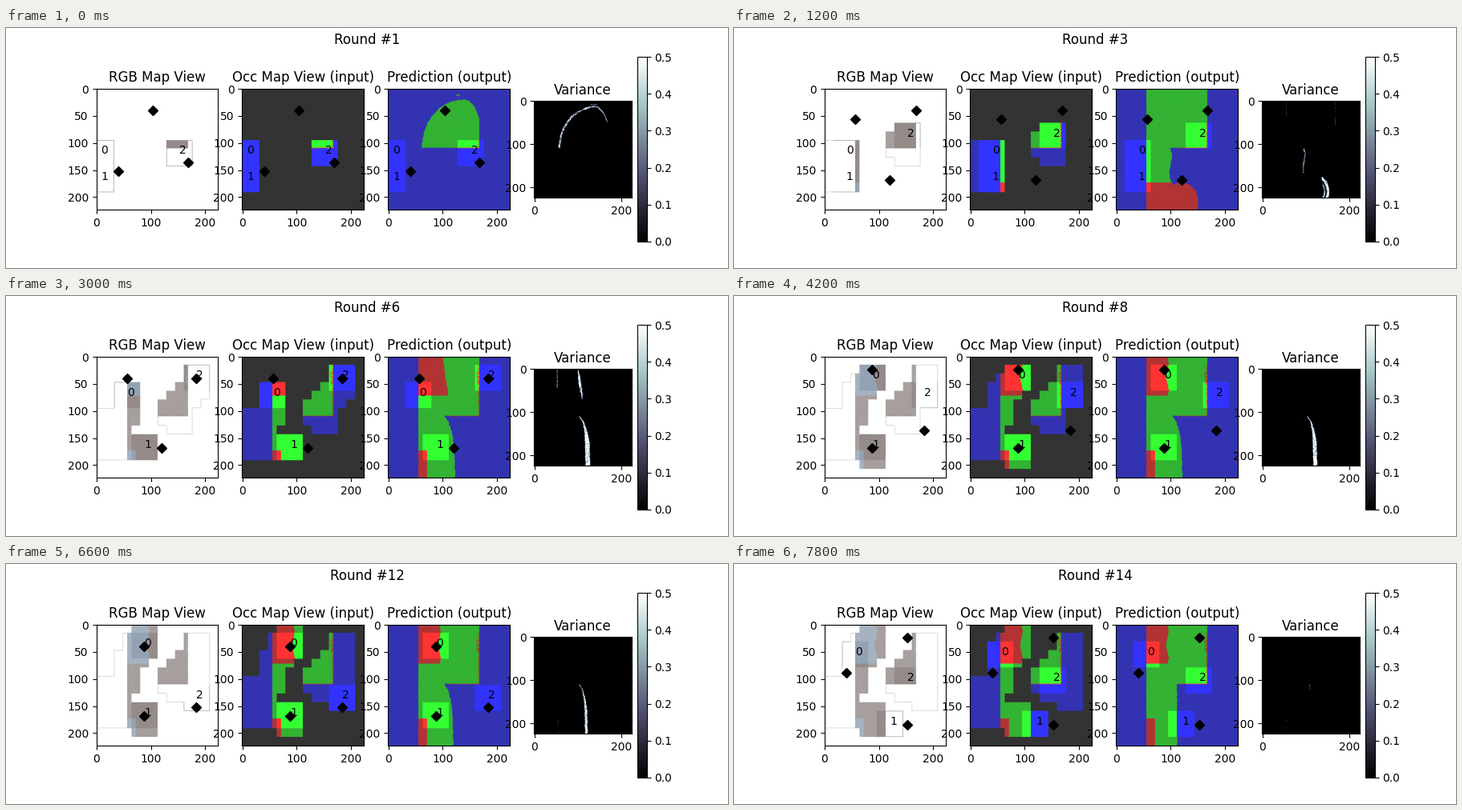
A matplotlib script for the animation above (8000 ms loop, 900 by 300 pixels).

```python
import numpy as np
import matplotlib.pyplot as plt
from matplotlib.animation import FuncAnimation

N, CELL, ROUNDS = 224, 16, 14
RED, GREEN, BLUE = 0, 1, 2
Y, X = np.mgrid[:N, :N]
WALL_L, WALL_R, TURN_X, TURN_Y = 56, 168, 112, 110
rng = np.random.default_rng(4)

# Waypoints in grid cells; a repeated one means waiting a round
WAYPOINTS = [
    [(0, 7), (2, 7), (3, 4), (5, 1), (4, 2), (5, 2), (5, 2), (3, 3)],
    [(0, 10), (5, 10), (5, 11)] + [(5, 10)] * 5 + [(7, 11)],
    [(9, 7), (8, 6), (10, 4), (11, 2), (11, 8), (9, 6)],
]
# Goals, keyed by the round in which they are chosen
GOALS = {
    1: [(6, 2), (2, 9), (10, 8)],
    2: [(3, 3), (7, 10), (10, 2)],
    4: [(3, 2), (7, 10), (11, 2)],
    7: [(5, 1), (5, 10), (11, 8)],
    9: [(4, 2), (5, 10), (11, 9)],
    11: [(5, 2), (5, 10), (11, 9)],
    13: [(2, 5), (9, 11), (9, 1)],
}


def walk(stops):
    """Move one cell per round, diagonals allowed, from stop to stop."""
    path = [np.array(stops[0])]
    for stop in stops[1:]:
        path.append(path[-1] + np.sign(stop - path[-1]))
        while (path[-1] != stop).any():
            path.append(path[-1] + np.sign(stop - path[-1]))
    return path


PATHS = [walk(stops) for stops in WAYPOINTS]


def centre(cell):
    return cell[0] * CELL + CELL // 2, cell[1] * CELL + CELL // 2


def goals_at(rnd):
    return GOALS[max(k for k in GOALS if k <= rnd)]


def wobble(size):
    """Smooth random offset for each row."""
    steps = rng.normal(0, size, N + 4)
    return np.convolve(steps, np.ones(5) / 3, "valid")[:, None]


def view(rnd):
    mask = np.zeros((N, N), bool)
    for path in PATHS:
        x, y = centre(path[rnd - 1])
        mask |= (abs(X + 0.5 - x) < 24) & (abs(Y + 0.5 - y) < 24)
    return mask


def ellipse(cx, cy, rx, ry):
    return np.hypot((X - cx) / rx, (Y - cy) / ry)


LOWER_WOBBLE = wobble(0.5)
RED_EDGE = 94 + 2 * np.sin(Y / 8) + wobble(0.5)
WIDE_RED_EDGE = 100 + Y / 7 + wobble(0.6)
DOME = ellipse(140, TURN_Y, np.where(X < 140, 78, 34), 90) + wobble(0.006)
LOBE = ellipse(120, 210, 31, 36) + wobble(0.01)


def lower_edge(rnd):
    """Guessed right side of the lower corridor."""
    if rnd >= 13:
        return TURN_X + 0.3 * LOWER_WOBBLE
    if rnd < 4:
        return 100 + 2 * np.sin(Y / 9) + LOWER_WOBBLE
    spread = 20 - 0.8 * abs(rnd - 6) ** 0.8
    return 103 + spread * (1 - np.exp(-(Y - TURN_Y) / 24)) + LOWER_WOBBLE


def floor_plan(corridor, red_edge):
    cls = np.full((N, N), BLUE)
    cls[:TURN_Y, WALL_L:WALL_R] = GREEN
    cls[(X >= WALL_L) & (X < corridor) & (Y >= TURN_Y)] = GREEN
    cls[(X >= WALL_L) & (X < red_edge) & (Y < 73)] = RED
    cls[174:, WALL_L:72] = RED
    return cls


def true_map():
    cls = floor_plan(TURN_X, RED_EDGE)
    cls[TURN_Y, TURN_X:WALL_R] = RED
    chance = np.where(X >= 166, 0.6, 0.5 * (abs(Y - 40) < 12))
    speckle = rng.random((N, N)) < chance
    cls[speckle & (X >= 163) & (X < WALL_R) & (Y < TURN_Y)] = RED
    return cls


TRUTH = true_map()


def predict(rnd, known):
    if rnd == 1:
        cls = np.full((N, N), BLUE)
        cls[(DOME < 1) & (X < WALL_R) & (Y < TURN_Y)] = GREEN
        cls[12:14, 125:132] = GREEN
    else:
        red_edge = 0 if rnd < 5 else WIDE_RED_EDGE if rnd < 7 else RED_EDGE
        cls = floor_plan(lower_edge(rnd), red_edge)
        if rnd < 4:
            cls[(X >= WALL_L) & ((X < 104) | (LOBE < 1)) & (Y >= 174)] = RED
    cls[known] = TRUTH[known]
    return cls


def band(offset, width, where=True, level=0.5, gap=0.1):
    """Ragged bright line where the offset is near zero."""
    value = level * np.clip(width + 0.6 - abs(offset), 0, 1)
    return value * where * (rng.random((N, N)) > gap)


def variance(rnd):
    if rnd == 1:
        left = X < 100
        return np.maximum(
            band((DOME - 1.05) * 80, np.where(left, 2, 1.3),
                 (Y < TURN_Y) & (X < 168), gap=0.3),
            band(Y - 10, 0.6, abs(X - 137) < 8, 0.35))

    edge = X - lower_edge(rnd)
    below = Y > TURN_Y
    if rnd < 4:
        return np.max([
            band(edge + 4, 1, below & (Y < 168), 0.45, 0.3),
            band((LOBE - 1) * 33, 3, (X > 136) & (Y > 174)),
            band((LOBE - 0.75) * 33, 1.5, (X > 138) & (Y > 186), gap=0.3),
            band(X - WALL_L, 0.5, Y < 36, 0.3, 0.6),
            band(X - WALL_R, 0.5, Y < 58, 0.25, 0.6)], axis=0)

    if rnd >= 13:
        line = band(edge + 3, 0.7, below & (Y < 122), 0.4, 0.4)
    else:
        thick = 5.2 - 0.4 * abs(rnd - 6)
        line = band(edge, thick * np.clip((Y - 105) / 65, 0.22, 1), below)
    if rnd in (5, 6):
        line += band(X - WIDE_RED_EDGE, 2.8 * np.sin(np.pi * Y / 74), Y < 72)
        line += band(X - 53, 0.8, Y < 45, 0.4, 0.4)
    elif rnd > 8:
        line += band(X - 55, 0.4, Y > 192, 0.25, 0.7)
    return line


def paint(cls, known, current):
    weight = 0.5 * known + 0.3 * current
    return 0.2 + np.eye(3)[cls] * weight[..., None]


TONES = np.array([[148, 163, 179], [149, 140, 138], [255, 255, 255]]) / 255
GRAIN = rng.normal(0, 0.015, (N, N, 1))


def photo(known, current):
    base = TONES[TRUTH] + GRAIN * (TRUTH != BLUE)[..., None]
    base[TURN_Y, TURN_X:WALL_R] = 0.45
    pad = np.pad(known, 1, constant_values=True)
    inner = pad[:-2, 1:-1] & pad[2:, 1:-1] & pad[1:-1, :-2] & pad[1:-1, 2:]
    outline = known & ~inner & (TRUTH == BLUE)
    base[outline] = np.where(current, 0.6, 0.75)[outline, None]
    alpha = np.where(current, 1, 0.83) * known
    return np.clip(1 + (base - 1) * alpha[..., None], 0, 1)


def build_rounds():
    rounds, known = [], np.zeros((N, N), bool)
    for rnd in range(1, ROUNDS + 1):
        current = view(rnd)
        known = known | current
        rounds.append((photo(known, current),
                       paint(TRUTH, known, current),
                       paint(predict(rnd, known), np.ones((N, N)), current),
                       variance(rnd)))
    return rounds


SCENES = build_rounds()

fig, axes = plt.subplots(1, 4, figsize=(9, 3), dpi=100)
heading = fig.suptitle("Round #1")
titles = ["RGB Map View", "Occ Map View (input)", "Prediction (output)", "Variance"]
images = [ax.imshow(img, cmap="bone", vmin=0, vmax=0.5)
          for ax, img in zip(axes, SCENES[0])]
for ax, title in zip(axes, titles):
    ax.set_title(title)
    ax.set_xticks([0, 100, 200])
    ax.set_yticks(range(0, N, 50))
axes[3].set_xticks([0, 200])
axes[3].set_yticks([0, 100, 200])
fig.colorbar(images[3], ax=axes[3])

labels, markers = [], []
for ax in axes[:3]:
    labels.append([ax.text(0, 0, str(i)) for i in range(len(PATHS))])
    markers.append(ax.plot([0], [0], "D", color="black", ms=6)[0])
    ax.set(xlim=(-0.5, N - 0.5), ylim=(N - 0.5, -0.5))


def update(frame):
    rnd = frame // 3 + 1
    heading.set_text(f"Round #{rnd}")
    for image, data in zip(images, SCENES[rnd - 1]):
        image.set_data(data)
    goals = [centre(g) for g in goals_at(rnd)]
    for names, marker in zip(labels, markers):
        marker.set_data(*zip(*goals))
        for name, path in zip(names, PATHS):
            name.set_position(centre(path[rnd - 1]))
    return images


anim = FuncAnimation(fig, update, frames=40, interval=200, repeat=True, blit=False)
plt.show()
```
